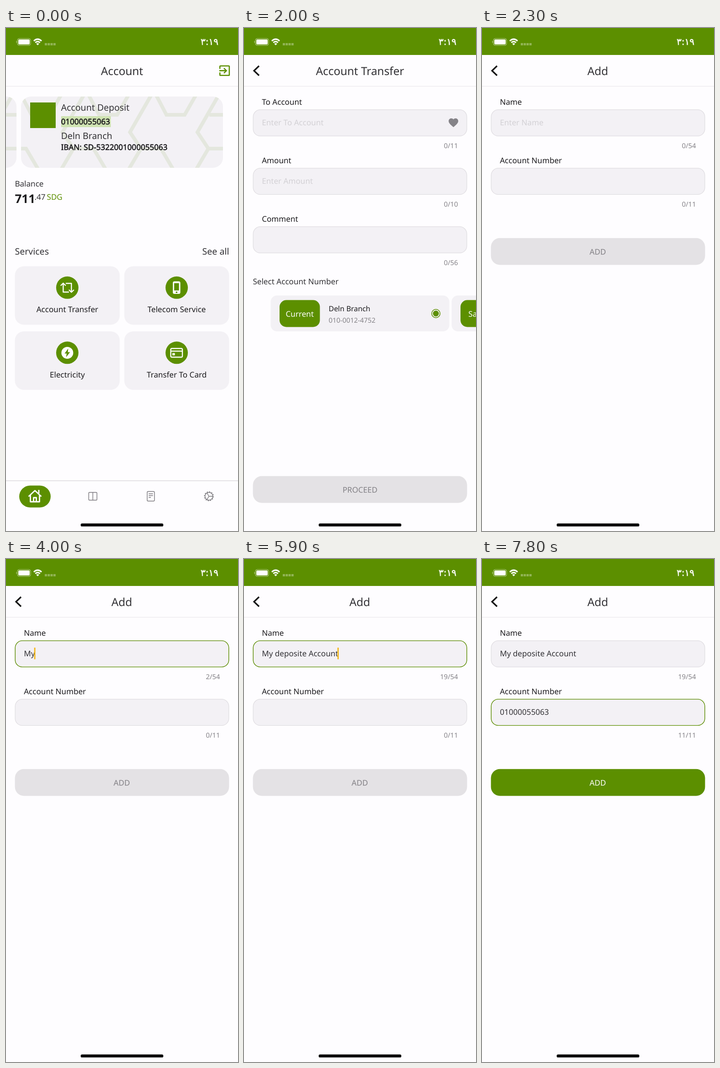
Recreate the animation shown at these times as an HTML page. Size 509x1101 px, loop 8 s.

```html
<!DOCTYPE html>
<html lang="en">
<head>
<meta charset="utf-8">
<title>Account transfer</title>
<style>
  html, body { margin: 0; width: 100%; height: 100%; overflow: hidden; background: #fefdff; }
  svg { display: block; width: 509px; height: 1101px; }
  text { font: 17.1px "Noto Sans", "Open Sans", sans-serif; fill: #1c1b1e; white-space: pre; text-rendering: geometricPrecision; }
  .title { font-size: 24.4px; text-anchor: middle; }
  .lead { font-size: 19.57px; }
  .soft { fill: #333236; }
  .small { font-size: 14.8px; fill: #838186; }
  .mid { text-anchor: middle; }
  .end { text-anchor: end; }
  .bold { stroke: #1c1b1e; stroke-width: .6; }
  .hint { fill: #d3d1d5; }
  .white { fill: #fff; }
  .muted { fill: #838186; }
  .green { fill: #5c8f00; }
  .panel { fill: #f3f1f5; }
  .off { fill: #e4e2e5; }
  .field { fill: #f3f1f5; stroke: #dfdde1; stroke-width: 1.3; }
  .focus { fill: none; stroke: #5c8f00; stroke-width: 1.4; }
  .caret { fill: #f3b71b; }
  .line { fill: none; stroke: #fff; stroke-width: 2.4; stroke-linejoin: round; }
  .nav { fill: none; stroke: #77757a; stroke-width: 1.4; stroke-linejoin: round; }
</style>
</head>
<body>
<svg viewBox="0 0 509 1101">
  <defs>
    <rect id="field" x="20.2" y="178.9" width="468.6" height="57.5" rx="15.5"/>
    <rect id="tile" width="230" height="128" rx="20"/>
    <rect id="button" x="19.6" width="469.8" height="58.7" rx="19.6"/>
    <path id="back" d="M33 83L22 93.5L33 104" fill="none" stroke="#111" stroke-width="3.3"/>
    <path id="hex" d="M330 148L352 190H392L416 148M318 148L272 228L296 264H340L366 308M296 264L270 308"
      fill="none" stroke="#e4e7de" stroke-width="8"/>
    <clipPath id="cardShape"><rect x="33" y="150" width="443" height="156" rx="22"/></clipPath>
    <g id="card" clip-path="url(#cardShape)">
      <rect class="panel" x="33" y="150" width="443" height="156"/>
      <use href="#hex"/><use href="#hex" x="148"/><use href="#hex" x="-148"/><use href="#hex" x="-296"/>
      <path d="M446 190H476" stroke="#e4e7de" stroke-width="8"/>
    </g>
  </defs>

  <rect width="509" height="1101" fill="#fefdff"/>
  <rect class="green" width="509" height="59"/>
  <path d="M0 127.5H509" stroke="#e7e5e9" stroke-width="1.2"/>

  <g id="home">
    <text class="title soft" x="254.5" y="102.5">Account</text>
    <path class="green" transform="translate(464.1 77.9) scale(1.29)" d="M10.09 15.59L11.5 17l5-5-5-5-1.41 1.41L12.67 11H3v2h9.67zM19 3H5a2 2 0 0 0-2 2v4h2V5h14v14H5v-4H3v4a2 2 0 0 0 2 2h14a2 2 0 0 0 2-2V5a2 2 0 0 0-2-2z"/>
    <use href="#card"/><use href="#card" x="-453"/>
    <rect class="green" x="53" y="163" width="56" height="56"/>
    <text class="lead soft" x="120.7" y="181.3">Account Deposit</text>
    <rect id="mark" x="121" y="193" width="109" height="24" fill="#cfe3b2"/>
    <text class="bold" x="120.7" y="211.2">01000055063</text>
    <text class="lead soft" x="120.7" y="242.8">Deln Branch</text>
    <text class="bold" x="120.7" y="267">IBAN: SD-5322001000055063</text>
    <text class="soft" x="19.4" y="346.5">Balance</text>
    <text x="19.4" y="383" style="font-size:26.1px;font-weight:700">711</text>
    <text class="soft" x="62.5" y="375.7">.47</text>
    <text class="green" x="89.5" y="375.7">SDG</text>
    <text class="lead soft" x="19.4" y="496">Services</text>
    <text class="lead soft end" x="489.5" y="496">See all</text>

    <g class="panel">
      <use href="#tile" x="19.5" y="521.5"/><use href="#tile" x="259.5" y="521.5"/>
      <use href="#tile" x="19.5" y="664"/><use href="#tile" x="259.5" y="664"/>
    </g>
    <g class="green">
      <circle cx="134.5" cy="568.3" r="24.5"/><circle cx="374.5" cy="568.3" r="24.5"/>
      <circle cx="134.5" cy="710.8" r="24.5"/><circle cx="374.5" cy="710.8" r="24.5"/>
    </g>
    <path class="line" d="M120 564L125.5 558.5L131 564M125.5 559V578H138M138 573L143.5 578.5L149 573M143.5 578V559H131"/>
    <rect class="white" x="366" y="554.5" width="16.5" height="27.5" rx="3.5"/>
    <path class="green" d="M369 558.5H379.5V574.5H369zM372.5 577H376V580H372.5z"/>
    <circle class="white" cx="134.5" cy="711" r="13"/>
    <path class="green" d="M136.5 701.5L128.5 712.5H133L132 720.5L140.5 709.5H135.7z"/>
    <rect class="line" x="361.5" y="701.5" width="25.5" height="19" rx="2.5"/>
    <path class="line" d="M361 707.3H387"/>
    <rect class="white" x="365" y="711.5" width="5.5" height="5"/>
    <text class="mid" x="134.5" y="622.4">Account Transfer</text>
    <text class="mid" x="374.5" y="622.4">Telecom Service</text>
    <text class="mid" x="134.5" y="765">Electricity</text>
    <text class="mid" x="374.5" y="765">Transfer To Card</text>

    <path d="M0 991H509" stroke="#dcdade" stroke-width="1.5"/>
    <rect class="green" x="29" y="1001.5" width="69" height="48" rx="24"/>
    <path class="line" style="stroke-width:2.8" d="M49.5 1025.5L63.5 1012.5L77.5 1025.5M53.5 1022.5V1037H73.5V1022.5M72 1019V1011M60.5 1037V1028H66.5V1037"/>
    <rect class="nav" x="181.5" y="1016.5" width="18" height="17" rx="1.5"/>
    <path class="nav" d="M190.5 1016.5V1033.5"/>
    <rect class="nav" x="309.7" y="1014.5" width="16" height="21" rx="2"/>
    <path class="nav" d="M313 1019.5H322.5M313 1023.5H322.5M313 1027.5H318"/>
    <circle class="nav" cx="445.2" cy="1025" r="8.5"/>
    <circle class="nav" cx="445.2" cy="1025" r="10" stroke-dasharray="2.62 2.616"/>
    <path class="nav" d="M445.2 1025H453.8M445.2 1025L440.9 1017.6M445.2 1025L440.9 1032.4"/>
  </g>

  <g id="transfer">
    <use href="#back"/>
    <text class="title soft" x="254.5" y="102.5">Account Transfer</text>
    <text x="39.2" y="167.5">To Account</text>
    <use class="field" href="#field"/>
    <text class="hint" x="39.2" y="213.3">Enter To Account</text>
    <path fill="#858388" transform="translate(446.9 194.7) scale(1.05)" d="M12 21.35l-1.45-1.32C5.4 15.36 2 12.28 2 8.5 2 5.42 4.42 3 7.5 3c1.74 0 3.41.81 4.5 2.09C13.09 3.81 14.76 3 16.5 3 19.58 3 22 5.42 22 8.5c0 3.78-3.4 6.86-8.55 11.54z"/>
    <text class="small end" x="469.5" y="263.3">0/11</text>
    <text x="39.2" y="296">Amount</text>
    <use class="field" href="#field" y="128"/>
    <text class="hint" x="39.2" y="341.2">Enter Amount</text>
    <text class="small end" x="469.5" y="391.3">0/10</text>
    <text x="39.2" y="424">Comment</text>
    <use class="field" href="#field" y="256"/>
    <text class="small end" x="469.5" y="519.3">0/56</text>
    <text class="soft" x="19.4" y="561">Select Account Number</text>
    <rect class="panel" x="58.5" y="585.5" width="392" height="78.5" rx="14"/>
    <rect class="panel" x="455.5" y="585.5" width="392" height="78.5" rx="14"/>
    <rect class="green" x="78" y="595.5" width="88.5" height="59" rx="15"/>
    <rect class="green" x="475" y="595.5" width="88.5" height="59" rx="15"/>
    <text class="white mid" x="122.3" y="631.5">Current</text>
    <text class="white" x="492.3" y="631.5">Savings</text>
    <text x="185.8" y="620" style="font-size:15.9px">Deln Branch</text>
    <text class="small" x="185.8" y="644.5">010-0012-4752</text>
    <circle cx="421" cy="625" r="9.2" fill="none" stroke="#5c8f00" stroke-width="1.5"/>
    <circle class="green" cx="421" cy="625" r="6.5"/>
    <use class="off" href="#button" y="980.7"/>
    <text class="muted mid" x="254.5" y="1017">PROCEED</text>
  </g>

  <g id="add">
    <use href="#back"/>
    <text class="title soft" x="254" y="102.5">Add</text>
    <text x="39.2" y="167.5">Name</text>
    <use class="field" href="#field"/>
    <use class="focus" id="nameFocus" href="#field"/>
    <text class="hint" id="nameHint" x="39.2" y="213.3">Enter Name</text>
    <text class="soft" id="nameText" x="39.2" y="213.3"></text>
    <rect class="caret" id="nameCaret" y="194" width="2.8" height="25.5"/>
    <text class="small end" id="nameCount" x="469.5" y="263.3"></text>
    <text x="39.2" y="296">Account Number</text>
    <use class="field" href="#field" y="128"/>
    <use class="focus" id="numFocus" href="#field" y="128"/>
    <text class="soft" id="numText" x="39.2" y="341.2"></text>
    <rect class="caret" id="numCaret" y="322" width="2.8" height="25.5"/>
    <text class="small end" id="numCount" x="469.5" y="391"></text>
    <use id="addButton" href="#button" y="459.7"/>
    <text class="mid" id="addLabel" x="254" y="496">ADD</text>
  </g>

  <rect id="dim" width="509" height="1101" opacity=".28"/>

  <g id="status">
    <rect x="25" y="23" width="29" height="15" rx="4" fill="none" stroke="#fff" stroke-opacity=".6"/>
    <rect class="white" x="27" y="25" width="25" height="11" rx="2.2"/>
    <path class="white" opacity=".55" d="M23.5 28Q21 30.500 23.5 33z"/>
    <path d="M61 28.3Q69.5 20.3 78 28.3M64.3 32Q69.5 27.3 74.7 32" fill="none" stroke="#fff" stroke-width="3"/>
    <path class="white" d="M69.5 37.8L66.3 34.5Q69.5 31.8 72.7 34.5z"/>
    <path d="M85 35.5H109" stroke="#fff" stroke-opacity=".33" stroke-width="5" stroke-dasharray="5 1.3"/>
    <text class="white mid" x="446.5" y="37" stroke="#fff" stroke-width=".5" style="font:20px 'DejaVu Sans',sans-serif">٣:١٩</text>
    <rect x="163.8" y="1084.6" width="181.4" height="6.5" rx="3.2"/>
  </g>
</svg>
<script>
  const LOOP = 8000, STEP = 100;
  const TRANSFER = 1100, DIM = 2200, ADD = 2300, PASTE = 7300;
  const NAME = "My deposite Account", NUMBER = "01000055063";
  const $ = id => document.getElementById(id);
  const show = (id, on) => { $(id).style.display = on ? "" : "none"; };
  const fade = (id, v) => { $(id).style.opacity = v; };

  // Linear value between [time, value] stops.
  function ramp(t, ...stops) {
    const i = stops.findIndex(s => s[0] > t);
    if (i < 0) return stops[stops.length - 1][1];
    if (i === 0) return stops[0][1];
    const [t0, a] = stops[i - 1], [t1, b] = stops[i];
    return a + (b - a) * (t - t0) / (t1 - t0);
  }

  // A slow start, then one key per step with a short rest between words.
  const typed = t => Math.round(ramp(t, [3600, 0], [4000, 2], [4900, 11], [5000, 11], [5900, NAME.length]));

  function fill(id, value, limit) {
    const text = $(id + "Text");
    text.textContent = value;
    $(id + "Count").textContent = value.length + "/" + limit;
    $(id + "Caret").setAttribute("x", 37.5 + (value ? text.getComputedTextLength() : 0));
  }

  function render(t) {
    show("home", t < TRANSFER);
    show("transfer", t >= TRANSFER && t < ADD);
    show("add", t >= ADD);
    show("dim", t >= DIM && t < ADD);
    fade("mark", ramp(t, [0, 1], [200, 0]));
    if (t < ADD) return;

    const n = typed(t), pasted = t >= PASTE;
    fill("name", NAME.slice(0, n), 54);
    fill("num", pasted ? NUMBER : "", 11);
    show("nameHint", n === 0);
    fade("nameFocus", ramp(t, [3000, 0], [3200, 1], [6100, 1], [6400, 0]));
    fade("numFocus", ramp(t, [6100, 0], [6400, 1]));
    fade("nameCaret", t >= 6200 ? 0 : ramp(t, [3000, 0], [3100, 1], [3300, 1], [3500, 0], [3700, 1]));
    fade("numCaret", ramp(t, [6100, 0], [6200, 1], [6500, 1], [6800, 0], [6900, 0], [7100, 1], [7500, 1], [7800, 0]));
    $("addButton").setAttribute("class", pasted ? "green" : "off");
    $("addLabel").setAttribute("class", "mid " + (pasted ? "white" : "muted"));
  }

  let last = -1;
  function tick() {
    const t = Math.floor(performance.now() % LOOP / STEP) * STEP;
    if (t !== last) render(last = t);
    requestAnimationFrame(tick);
  }
  tick();
</script>
</body>
</html>
```
